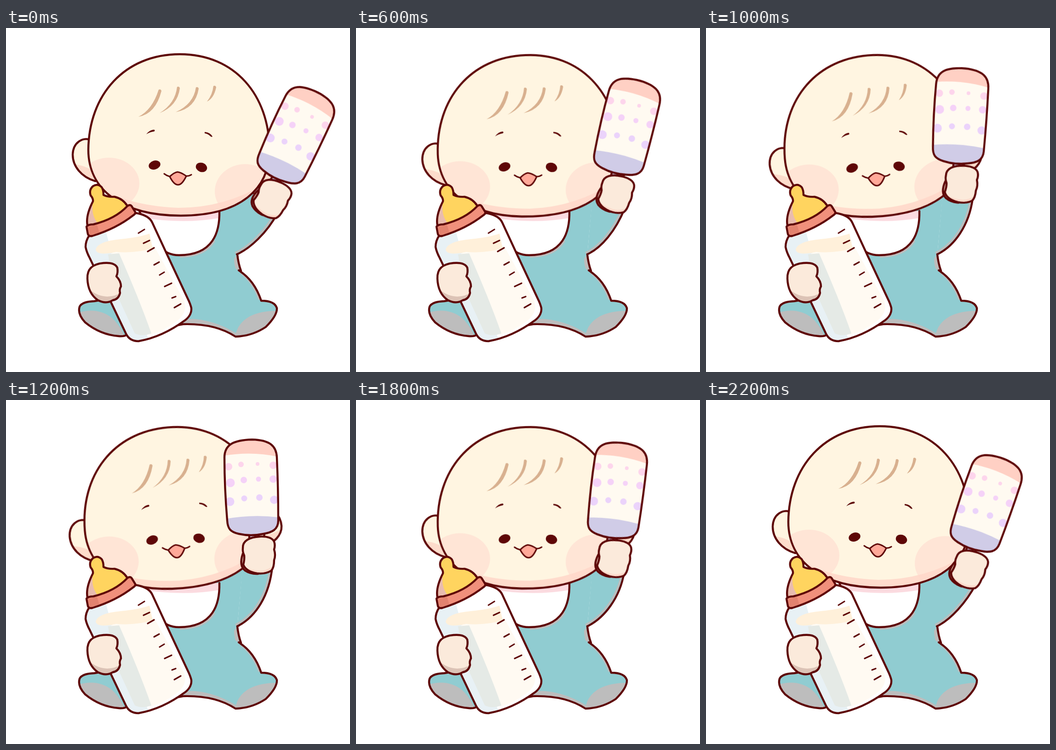
An HTML page that plays this animation: 748x748 px, repeating every 2.4 s.

```html
<!DOCTYPE html>
<html lang="en">
<head>
<meta charset="utf-8">
<title>Baby waving a rattle</title>
<style>
  html, body { margin: 0; width: 100%; height: 100%; overflow: hidden; background: #fff; }
  svg { display: block; width: 100vw; height: 100vh; }
  .line { stroke: #5e0707; stroke-width: 4.4; stroke-linecap: round; stroke-linejoin: round; }
  .thin { stroke-width: 3.2; }
  .open { fill: none; }
  .teal { fill: #90ccd1; }
  .gray { fill: #bdbdbd; }
  .skin { fill: #fbeadb; }
  .face { fill: #fff5e1; }

  .head, .wave, .arm { animation: 2400ms step-end infinite; }
  .head { animation-name: tilt; transform-origin: 373px 326px; }
  .wave { animation-name: wave; transform-origin: 548px 338px; }
  .arm { animation-name: arm; }

  @keyframes tilt {
    0%, 91.6667% { transform: none; }
    25%, 75% { transform: translate(1px, 2px) rotate(-2.2deg); }
    41.6667% { transform: translate(-3px, 2px) rotate(-5deg); }
  }
  @keyframes wave {
    0% { transform: translate(28px, 33px) rotate(27deg); }
    16.6667%, 91.6667% { transform: translate(22px, 30px) rotate(20.8deg); }
    25%, 83.3333% { transform: translate(15px, 23px) rotate(15.6deg); }
    33.3333%, 75% { transform: translate(11px, 7px) rotate(8.9deg); }
    41.6667%, 66.6667% { transform: translate(5px, 2px) rotate(5.4deg); }
    50% { transform: none; }
  }
  @keyframes arm {
    0% { d: path("M502 492C530 480 568 445 590 403L548 360L515 355"); }
    16.6667%, 91.6667% { d: path("M502 492C532 478 566 440 587 400L548 360L515 355"); }
    25%, 83.3333% { d: path("M503 492C534 478 565 440 584 393L548 360L515 355"); }
    33.3333%, 75% { d: path("M503 492C540 474 574 430 583 375L548 360L515 355"); }
    41.6667%, 66.6667% { d: path("M503 492C540 474 572 430 580 370L548 360L515 355"); }
    50% { d: path("M503 492C543 472 573 425 579 362L548 355L515 355"); }
  }
</style>
</head>
<body>
<svg viewBox="0 0 748 748" xmlns="http://www.w3.org/2000/svg">
  <defs>
    <path id="body" d="M503 492Q505 512 511 528L506 527Q540 548 555 593Q584 593 589 609Q590 625 565 650Q535 670 499 671Q455 642 385 644L262 667Q258 671 245 670Q205 667 172 640Q155 622 160 606Q165 595 192 594L215 590L300 400L515 360"/>
    <path id="skull" d="M179 265C180 145 258 57 378 57C498 57 572 146 573 265C573 350 510 408 380 408C250 408 179 350 179 265Z"/>
    <path id="earL" d="M184 243C166 237 146 249 145 275C145 301 164 324 194 333"/>
    <path id="earR" d="M566 250C588 245 606 268 606 292C605 312 588 328 556 336"/>
    <path id="bib" d="M464 398C465 442 452 494 376 494C340 494 320 470 290 398"/>
    <path id="glass" d="M181 451Q173 463 173 476Q175 487 182 500L230 600L261 665Q269 681 288 681Q340 672 390 635Q404 624 403 609Q401 600 395 588L350 492L318 423Q311 407 281 402Z"/>
    <path id="teat" d="M185 442L177 429Q173 408 189 377Q190 371 184 364Q180 352 189 344Q199 337 208 346Q212 352 212 363Q222 368 236 367Q254 371 264 387L270 400Z"/>
    <path id="fistL" d="M177 545C176 522 190 513 212 511Q236 509 242 521Q244 532 240 540Q250 550 250 562Q246 568 248 576Q245 590 232 592Q218 601 200 592Q178 577 177 545Z"/>
    <path id="fistR" d="M515 322C514 306 530 298 552 297Q577 296 583 308Q586 316 583 325Q587 338 583 348Q583 364 577 371Q564 379 546 377Q522 373 516 358Q519 346 518 338Q514 330 515 322Z"/>
    <path id="rattle" d="M481 262C477 215 475 170 475 125C475 97 495 87 535 86C574 87 588 100 589 125C591 170 592 215 592 262C592 282 578 288 560 291Q532 297 506 291C488 287 482 280 481 262Z"/>
    <clipPath id="inBody"><use href="#body"/></clipPath>
    <clipPath id="inSkull"><use href="#skull"/></clipPath>
    <clipPath id="inEarL"><use href="#earL"/></clipPath>
    <clipPath id="inEarR"><use href="#earR"/></clipPath>
    <clipPath id="inBib"><use href="#bib"/></clipPath>
    <clipPath id="inGlass"><use href="#glass"/></clipPath>
    <clipPath id="inTeat"><use href="#teat"/></clipPath>
    <clipPath id="inFistL"><use href="#fistL"/></clipPath>
    <clipPath id="inFistR"><use href="#fistR"/></clipPath>
    <clipPath id="inRattle"><use href="#rattle"/></clipPath>
  </defs>

  <!-- body -->
  <use href="#body" class="teal"/>
  <g class="gray" clip-path="url(#inBody)">
    <path d="M160 618Q200 607 230 630Q250 648 262 680H150Z"/>
    <path d="M498 680Q498 645 530 627Q555 614 595 615V690Z"/>
    <path d="M503 490L496 502Q496 518 500 524L514 530Z"/>
    <path d="M380 636Q395 632 412 633Q460 638 502 665V680H380Z"/>
    <path class="open" stroke="#bdbdbd" stroke-width="9" d="M512 530Q540 552 553 590"/>
  </g>
  <use href="#body" class="line open"/>
  <path class="arm line teal" d="M502 492C530 480 568 445 590 403L548 360L515 355"/>
  <g transform="translate(-4 -3)">
    <path class="arm open" stroke="#bdbdbd" stroke-width="4" d="M502 492C530 480 568 445 590 403L548 360L515 355"/>
  </g>

  <!-- bib -->
  <path class="open" stroke="#bdbdbd" stroke-width="5" d="M378 497Q434 496 453 462"/>
  <use href="#bib" fill="#fff"/>
  <path clip-path="url(#inBib)" fill="#fbdbe0" d="M290 396H470V412Q390 427 300 413Z"/>
  <use href="#bib" class="line open"/>

  <!-- head -->
  <g class="head">
    <use href="#earL" class="face"/>
    <path clip-path="url(#inEarL)" fill="#fddccb" d="M140 296Q172 296 200 318V340H140Z"/>
    <use href="#earL" class="line open"/>
    <use href="#earR" class="face"/>
    <path clip-path="url(#inEarR)" fill="#fddccb" d="M540 312Q580 312 612 296V345H540Z"/>
    <use href="#earR" class="line open"/>
    <use href="#skull" class="face"/>
    <g clip-path="url(#inSkull)">
      <ellipse cx="224" cy="338" rx="66" ry="56" fill="#ffe5d6"/>
      <ellipse cx="520" cy="355" rx="66" ry="59" fill="#ffe5d6"/>
      <path fill="#ffd8c9" opacity=".85" d="M180 332Q250 386 375 391Q475 391 560 340V420H180Z"/>
    </g>
    <use href="#skull" class="line open"/>
    <g fill="#d8b08f">
      <path d="M332 134Q337 132 338 137Q325 187 288 193Q318 178 332 134Z"/>
      <path d="M372 128Q377 126 378 131Q373 169 334 185Q368 164 372 128Z"/>
      <path d="M413 129Q418 127 419 132Q412 175 369 183Q408 165 413 129Z"/>
      <path d="M451 126Q456 124 457 129Q452 153 437 160Q449 145 451 126Z"/>
    </g>
    <g fill="#5e0707">
      <path d="M305 231Q313 221 322 221Q325 223 322 225Q313 226 305 231Z"/>
      <path d="M432 226Q444 227 449 236Q447 238 444 235Q439 230 432 229Z"/>
      <ellipse cx="323" cy="298" rx="13" ry="9.5" transform="rotate(-18 323 298)"/>
      <ellipse cx="425" cy="303" rx="12.5" ry="10" transform="rotate(20 425 303)"/>
    </g>
    <path class="line thin" fill="#ffa999" d="M356 323Q366 314 373 313Q381 314 392 322Q383 341 374 341Q365 341 356 323Z"/>
    <path class="line thin open" d="M344 317Q349 321 356 323M392 322Q398 322 403 319"/>
  </g>

  <!-- bottle -->
  <use href="#teat" fill="#ffd45f"/>
  <path clip-path="url(#inTeat)" fill="#e9bcae" d="M170 445V345Q190 375 188 392Q188 412 202 428Z"/>
  <use href="#teat" class="line open"/>
  <use href="#glass" fill="#fff"/>
  <g clip-path="url(#inGlass)">
    <path fill="#e8f1f5" d="M170 445L216 434Q222 470 240 510L316 690H250L165 490Z"/>
    <path fill="#fffaf2" d="M228 490L322 474L388 594Q396 620 368 640Q340 660 312 667Z"/>
    <path fill="#e5eae6" d="M222 492L246 490Q290 590 316 664Q296 672 280 664L232 560Z"/>
    <path fill="#fff0da" d="M195 482Q198 464 250 459Q290 455 312 447L319 479Q285 490 240 487Q198 496 195 482Z"/>
  </g>
  <use href="#glass" class="line open"/>
  <path class="line" fill="#f0907c" d="M175 432Q178 427 190 427Q238 415 264 387Q270 383 273 387L281 400Q282 404 277 407Q240 436 188 452Q180 454 178 448Z"/>
  <path fill="#d97a68" opacity=".6" d="M178 433L198 428L203 445L182 450Z"/>
  <path class="line thin open" d="M288 446L301 438M299 468L312 462M308 486L322 478M322 515L333 509M334 537L344 531M345 562L360 555M361 587L369 584M366 608L380 600"/>
  <use href="#fistL" class="skin"/>
  <path clip-path="url(#inFistL)" fill="#dcc3b6" d="M175 560Q190 582 220 584Q238 584 252 574V605H175Z"/>
  <use href="#fistL" class="line open"/>

  <!-- rattle and raised hand -->
  <g class="wave">
    <path class="line" fill="#d0cce7" d="M529 288V304H549V288Z"/>
    <use href="#rattle" fill="#fffaf1"/>
    <g clip-path="url(#inRattle)">
      <path fill="#ffd0c4" d="M470 122Q532 110 595 124V80H470Z"/>
      <path fill="#d0cce7" d="M470 260Q535 247 600 256V300H470Z"/>
      <g fill="#fdd5ec">
        <circle cx="484" cy="145" r="8"/><circle cx="511" cy="140" r="6"/>
        <circle cx="547" cy="139" r="4"/><circle cx="581" cy="142" r="8"/>
      </g>
      <g fill="#f5d2f8">
        <circle cx="488" cy="180" r="9.5"/><circle cx="517" cy="174" r="7"/>
        <circle cx="549" cy="172" r="5.5"/><circle cx="581" cy="172" r="8"/>
      </g>
      <g fill="#ebd3fb">
        <circle cx="487" cy="221" r="9.5"/><circle cx="518" cy="214" r="6.5"/>
        <circle cx="551" cy="212" r="7"/><circle cx="583" cy="217" r="9"/>
      </g>
    </g>
    <use href="#rattle" class="line open"/>
    <path class="line" fill="#dcb5a6" d="M515 334Q506 360 520 371Q532 379 548 378"/>
    <use href="#fistR" class="skin"/>
    <path clip-path="url(#inFistR)" fill="#fddacb" d="M510 358Q530 372 556 371Q575 369 590 352V385H510Z"/>
    <use href="#fistR" class="line open"/>
  </g>
</svg>
</body>
</html>
```
